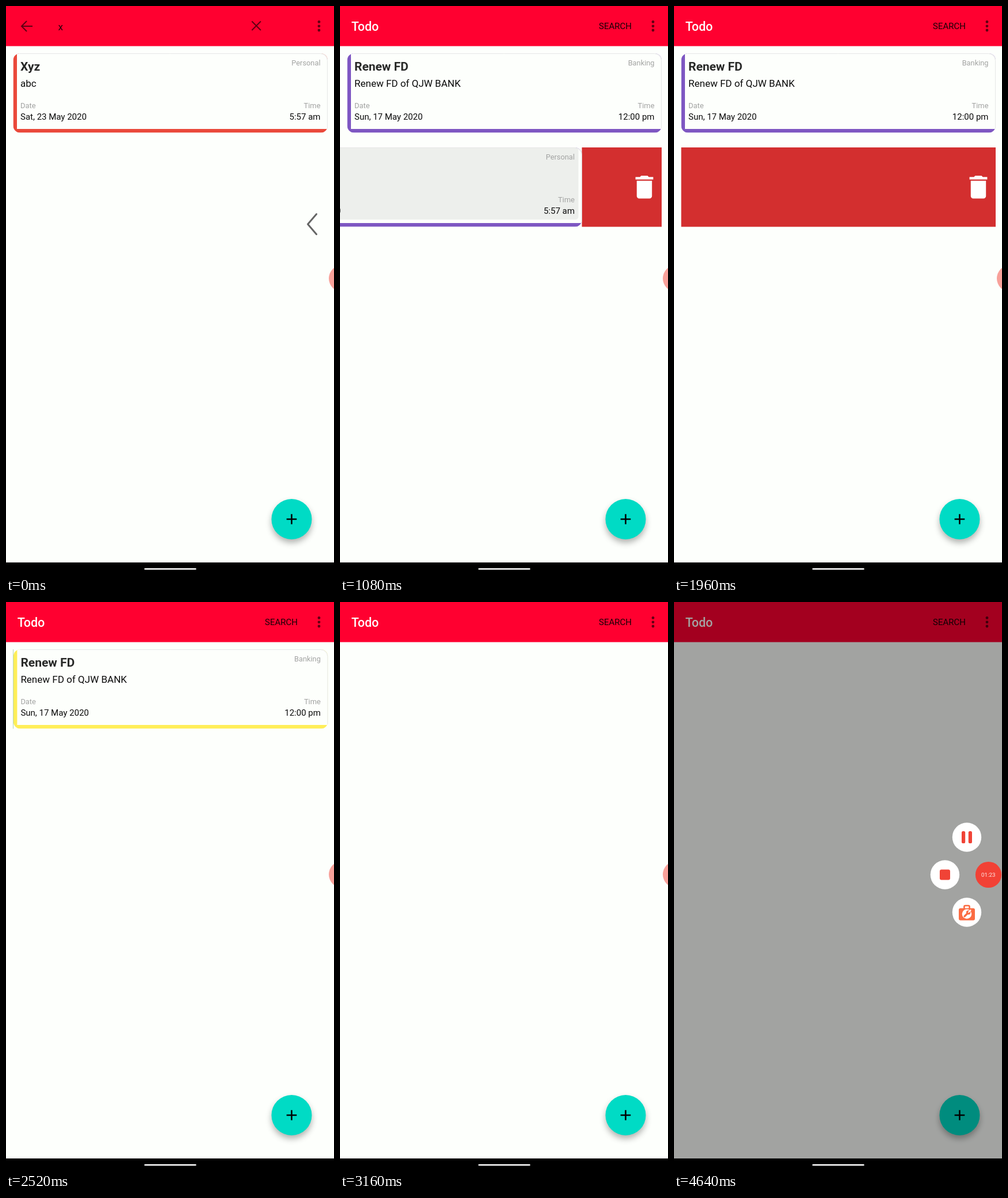
Animation of 569x984 px, one loop 5.04 s. Source, as an HTML page with a canvas:

```html
<!DOCTYPE html>
<html lang="en">
<head>
<meta charset="utf-8">
<title>Todo</title>
<style>
  html, body { margin: 0; width: 100%; height: 100%; overflow: hidden; background: #fdfffc; }
  canvas { display: block; width: 569px; height: 984px; }
</style>
</head>
<body>
<canvas id="stage" width="569" height="984"></canvas>
<script>
const ctx = document.getElementById('stage').getContext('2d');
const LOOP = 5040;
const BG = '#fdfffc', INK = '#0c0c0c', MUTED = '#a2a3a2', ICON = 'rgba(0,0,0,.62)';
const RED = '#ea493b', PURPLE = '#7e57c2', YELLOW = '#ffee58';
const CARD = { x: 12.5, w: 545.5, h: 137.5 };

const TRASH = new Path2D('M6 19c0 1.1.9 2 2 2h8c1.1 0 2-.9 2-2V7H6v12zM19 4h-3.5l-1-1h-5l-1 1H5v2h14V4z');
const CHECK = new Path2D('M9 16.17L4.83 12l-1.42 1.41L9 19 21 7l-1.41-1.41z');

const bank = { title: 'Renew FD', note: 'Renew FD of QJW BANK', tag: 'Banking', date: 'Sun, 17 May 2020', time: '12:00 pm' };
const task = { title: 'Xyz', note: 'abc', tag: 'Personal', date: 'Sat, 23 May 2020', time: '5:57 am' };

// Swipe distances over time: [ms, px]
const PEEK = [[800, 0], [920, 45], [1080, 138], [1280, 212], [1400, 205], [1500, 130], [1600, 30], [1680, 0]];
const FLING_LEFT = [[1720, 0], [1800, 110], [1880, 330], [1960, 569]];
const FLING_RIGHT = [[2520, 0], [2680, 60], [2840, 170], [2960, 310], [3080, 569]];

const clamp = v => Math.max(0, Math.min(1, v));
const ramp = (t, a, b) => clamp((t - a) / (b - a));

function track(keys, t) {
  if (t <= keys[0][0]) return keys[0][1];
  for (let i = 1; i < keys.length; i++) {
    const [t0, v0] = keys[i - 1], [t1, v1] = keys[i];
    if (t <= t1) return v0 + (v1 - v0) * ramp(t, t0, t1);
  }
  return keys[keys.length - 1][1];
}

function text(str, x, y, size, color = INK, weight = 400, align = 'left') {
  ctx.font = `${weight} ${size}px Roboto, sans-serif`;
  ctx.textAlign = align;
  ctx.fillStyle = color;
  ctx.fillText(str, x, y);
}

function rect(x, y, w, h, color) {
  ctx.fillStyle = color;
  ctx.fillRect(x, y, w, h);
}

function round(x, y, w, h, r, color) {
  ctx.beginPath();
  ctx.roundRect(x, y, w, h, r);
  ctx.fillStyle = color;
  ctx.fill();
}

function disc(x, y, r, color) {
  ctx.beginPath();
  ctx.arc(x, y, r, 0, Math.PI * 2);
  ctx.fillStyle = color;
  ctx.fill();
}

function lines(color, width, ...paths) {
  ctx.strokeStyle = color;
  ctx.lineWidth = width;
  ctx.beginPath();
  for (const [start, ...rest] of paths) {
    ctx.moveTo(...start);
    rest.forEach(p => ctx.lineTo(...p));
  }
  ctx.stroke();
}

function group(x, y, scale, alpha, draw) {
  ctx.save();
  ctx.translate(x, y);
  ctx.scale(scale, scale);
  ctx.globalAlpha *= alpha;
  draw();
  ctx.restore();
}

function glyph(path, cx, cy) {
  group(cx - 26.4, cy - 26.4, 2.2, 1, () => {
    ctx.fillStyle = '#fff';
    ctx.fill(path);
  });
}

function card(item, color, y, dx = 0, press = 0, alpha = 1) {
  const { x, w, h } = CARD;
  group(dx, y, 1, alpha, () => {
    ctx.save();
    ctx.beginPath();
    ctx.roundRect(x, 0, w, h, 12);
    ctx.clip();
    rect(x, 0, w, h, color);
    rect(19, 0, 540, 131, BG);
    ctx.restore();
    if (press) round(19, 0, 533, 125, [0, 5, 5, 0], `rgba(0,0,0,${0.063 * press})`);
    ctx.strokeStyle = '#e6e7e6';
    ctx.lineWidth = 1;
    ctx.beginPath();
    ctx.moveTo(24, 0.5);
    ctx.arcTo(557.5, 0.5, 557.5, 14, 12);
    ctx.lineTo(557.5, 130);
    ctx.stroke();
    text(item.title, 25, 29.5, 21, '#282928', 700);
    text(item.note, 25, 58, 17);
    text('Date', 25, 95, 12.9, MUTED);
    text(item.date, 25, 114.5, 15);
    text(item.tag, 545.5, 20.5, 12.8, MUTED, 400, 'right');
    text('Time', 545.5, 95, 12.9, MUTED, 400, 'right');
    text(item.time, 545.5, 114.5, 15, INK, 400, 'right');
  });
}

// Coloured strip uncovered by a swiped card
function reveal(y, dx) {
  const mid = y + CARD.h / 2;
  const w = Math.min(Math.abs(dx), CARD.w);
  if (dx < 0) {
    rect(558 - w, y, w, CARD.h, '#d32f2f');
    glyph(TRASH, 528, mid);
  } else if (dx > 0) {
    rect(CARD.x, y, w, CARD.h, '#388e3c');
    glyph(CHECK, 42.5, mid);
  }
}

function swipeCard(item, color, y, dx, press) {
  reveal(y, dx);
  card(item, color, y, dx, press);
}

function toolbar(searching) {
  rect(0, 0, 569, 69.5, '#ff0030');
  if (searching) {
    lines(ICON, 2.1, [[46, 35], [28, 35]], [[36, 26], [27, 35], [36, 44]]);
    lines(ICON, 2.1, [[426.5, 26.5], [442, 42]], [[442, 26.5], [426.5, 42]]);
    text('x', 90.5, 42, 17, '#26000a');
  } else {
    text('Todo', 19.8, 43, 21.5, '#fff', 500);
    text('SEARCH', 449, 40, 15, '#160006');
  }
  for (const y of [27.5, 34.8, 42]) disc(543, y, 2.4, ICON);
}

function list(t) {
  if (t < 80) return card(task, RED, 82);
  if (t < 2000) {
    const dx = t < 1700 ? track(PEEK, t) : track(FLING_LEFT, t);
    const press = t < 1700 ? ramp(t, 820, 960) * (1 - ramp(t, 1400, 1560)) : ramp(t, 1740, 1840);
    card(bank, PURPLE, 82);
    return swipeCard(task, PURPLE, 245, -dx, press);
  }
  if (t < 2520) {
    const mix = ramp(t, 1960, 2120);
    if (mix < 1) card(bank, PURPLE, 82);
    return card(bank, YELLOW, 82, 0, 0, mix);
  }
  if (t < 3120) swipeCard(bank, YELLOW, 82, track(FLING_RIGHT, t), ramp(t, 2540, 2680));
}

function addButton() {
  ctx.save();
  ctx.shadowColor = 'rgba(0,0,0,.3)';
  ctx.shadowBlur = 11;
  ctx.shadowOffsetY = 6;
  disc(495.5, 889, 35, '#00dbc5');
  ctx.restore();
  lines('#000', 2.5, [[486.7, 889], [504.3, 889]], [[495.5, 880.2], [495.5, 897.8]]);
}

function backHint(t) {
  const p = ramp(t, 0, 200);
  if (p === 1) return;
  group(12 * p, 0, 1, 1 - p, () => {
    ctx.lineCap = ctx.lineJoin = 'round';
    lines('#646564', 3, [[538.5, 360.5], [523.5, 378], [538.5, 395.5]]);
  });
}

function pauseIcon() {
  round(-9, -10.5, 6.2, 21, 2.6, '#f04336');
  round(2.8, -10.5, 6.2, 21, 2.6, '#f04336');
}

function stopIcon() {
  round(-9, -9, 18, 18, 3, '#f04336');
}

function toolIcon() {
  const orange = '#fb6c43';
  ctx.strokeStyle = orange;
  ctx.lineWidth = 2.6;
  ctx.beginPath();
  ctx.roundRect(-4.6, -11.5, 9.2, 8, 2);
  ctx.stroke();
  round(-14, -7, 28, 21, 3, orange);
  disc(0, 3, 8.3, '#fff');
  ctx.lineCap = 'round';
  lines(orange, 3.2, [[-4, 7], [2, 1]]);
  disc(2.6, 0.4, 3.7, orange);
  lines('#fff', 2.2, [[3.2, -0.2], [6.5, -3.5]]);
}

function recorder(t) {
  if (t < 4120) return disc(583, 472, 23, '#f8a19a');
  rect(0, 0, 569, 964, 'rgba(0,0,0,.36)');
  const p = 1 - (1 - ramp(t, 4120, 4320)) ** 2;
  const buttons = [[508, 407.5, pauseIcon], [470, 472.5, stopIcon], [508, 537.5, toolIcon]];
  if (p > 0) {
    for (const [x, y, icon] of buttons) {
      group(545.5 + (x - 545.5) * p, 472.5 + (y - 472.5) * p, p, 1, () => {
        disc(0, 0, 25.2, '#fff');
        icon();
      });
    }
  }
  disc(545.5, 472.5, 22.6, '#f24135');
  text(t < 4520 ? '01:22' : '01:23', 545.3, 476.3, 9.8, '#ffe9e6', 400, 'center');
}

function draw(t) {
  rect(0, 0, 569, 984, BG);
  list(t);
  toolbar(t < 40);
  addButton();
  backHint(t);
  recorder(t);
  rect(0, 964, 569, 20, '#000');
  round(240, 974, 90, 2.4, 1.2, '#fff');
}

const start = performance.now();
function tick() {
  draw((performance.now() - start) % LOOP);
  requestAnimationFrame(tick);
}
tick();
</script>
</body>
</html>
```
